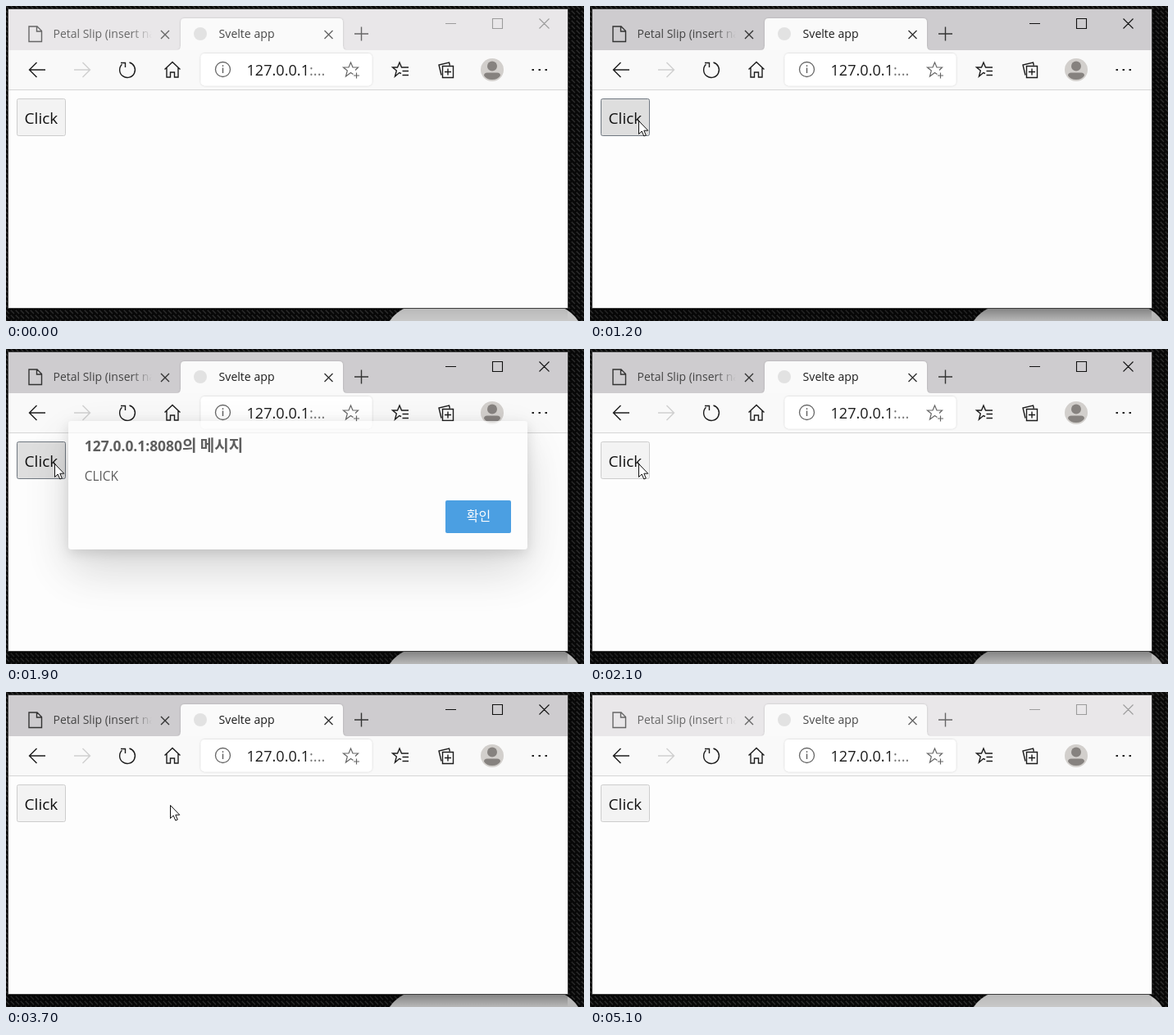
An HTML page for the animation above (5.2 s loop, 705 px wide and 385 px high).

```html
<!DOCTYPE html>
<html lang="en">
<head>
<meta charset="utf-8">
<title>Click once</title>
<style>
  html, body { margin: 0; width: 100%; height: 100%; overflow: hidden; background: #080808; }
  svg { display: block; width: 100%; height: 100%; }
  text { font-family: "Open Sans", "Noto Sans", sans-serif; white-space: pre; }
  .ko { font-family: "Noto Sans CJK KR", "Noto Sans CJK", sans-serif; }
  .line { fill: none; stroke: #1c1c1c; stroke-width: 1.4; }
  .caption { fill: none; stroke: var(--caption); stroke-width: 1.1; }
  .tab { fill: none; stroke: var(--tab); stroke-width: 1.4; }

  .active { --strip: #cecccf; --caption: #111; --tab: #333; --title: #1d1d1d; --side: #444; --blob: #b8b8b8; --shade: .3; }
  .idle { --strip: #e9e7e9; --caption: #9c9c9c; --tab: #666; --title: #484848; --side: #686868; --blob: #c8c8c8; --shade: .08; }
</style>
</head>
<body>
<svg id="stage" class="idle" viewBox="0 0 705 385">
  <defs>
    <pattern id="weave" width="6" height="6" patternUnits="userSpaceOnUse">
      <rect width="6" height="6" fill="#080808"/>
      <path d="M0 0L4 4M3 -3L7 1M-3 3L1 7" stroke="#2e2e2e" stroke-width="1.3"/>
    </pattern>
    <linearGradient id="fade" gradientUnits="userSpaceOnUse" x1="152" x2="178">
      <stop stop-color="#fff"/>
      <stop offset="1" stop-color="#000"/>
    </linearGradient>
    <mask id="cut" maskUnits="userSpaceOnUse" x="50" y="15" width="128" height="40">
      <rect x="50" y="15" width="128" height="40" fill="url(#fade)"/>
    </mask>
    <linearGradient id="under" x2="0" y2="1">
      <stop stop-color="#000"/>
      <stop offset="1" stop-color="#000" stop-opacity="0"/>
    </linearGradient>
    <linearGradient id="beside" href="#under" y2="0" x2="1"/>
    <filter id="lift" filterUnits="userSpaceOnUse" x="0" y="0" width="705" height="385">
      <feDropShadow dx="0" dy="4.8" stdDeviation="7.2" flood-opacity=".18"/>
    </filter>
    <filter id="cast" filterUnits="userSpaceOnUse" x="-50" y="0" width="805" height="385">
      <feGaussianBlur stdDeviation="28.8"/>
    </filter>
    <filter id="soft" x="-5%" y="-10%" width="110%" height="120%">
      <feDropShadow dx="0" dy="0" stdDeviation="1.2" flood-opacity=".2"/>
    </filter>
    <clipPath id="page"><rect x="3" y="3" width="682" height="366"/></clipPath>
    <path id="cross" d="M-5 -5L5 5M5 -5L-5 5"/>
    <path id="arrow" d="M20 0H0.5M9.5 -9L0.5 0L9.5 9"/>
  </defs>

  <!-- Desktop -->
  <rect width="705" height="385" fill="url(#weave)"/>
  <path d="M468 385Q475 374 489 368H678Q691 374 698 385Z" fill="var(--blob)"/>
  <rect x="3" y="369" width="682" height="16" fill="url(#under)" opacity="var(--shade)"/>
  <rect x="685" y="3" width="10" height="366" fill="url(#beside)" opacity="var(--shade)"/>

  <!-- Browser frame -->
  <rect x="2" y="3" width="684" height="367" fill="#3c3c3c"/>
  <rect x="3" y="4" width="682" height="365" fill="#fdfdfd"/>
  <rect x="3" y="4" width="682" height="50" fill="var(--strip)"/>
  <g clip-path="url(#page)">
    <path d="M208 54Q213 54 213 49V20Q213 15 218 15H406Q411 15 411 20V49Q411 54 416 54Z" fill="#fafafa" filter="url(#soft)"/>
  </g>
  <rect x="3" y="54" width="682" height="48" fill="#f9f9f9"/>
  <rect x="3" y="102" width="682" height="1" fill="#d6d6d6"/>

  <!-- Tabs -->
  <path class="tab" d="M28 25H38L43.5 30.5V43.5H28ZM37.5 25V31H43.5"/>
  <text x="57.5" y="39" font-size="14" fill="var(--side)" mask="url(#cut)">Petal Slip (insert name)</text>
  <use href="#cross" x="194" y="35" class="tab"/>
  <circle cx="237" cy="34" r="8" fill="#e2e2e2"/>
  <text x="259.6" y="39" font-size="14.1" fill="var(--title)">Svelte app</text>
  <use href="#cross" x="393.5" y="35" class="tab"/>
  <path class="tab" d="M425 34H442M433.5 25.5V42.5"/>
  <path class="caption" d="M536 21.5H549M593.5 15.5H605.5V27.5H593.5ZM650.5 15.5L662.5 27.5M662.5 15.5L650.5 27.5"/>

  <!-- Toolbar -->
  <g class="line">
    <use href="#arrow" x="28" y="78"/>
    <path d="M83 78H102.5M93.5 69L102.5 78L93.5 87" stroke="#cfcfcf"/>
    <path d="M150.5 69A9.4 9.4 0 1 1 141.5 71.3M140 69.5H145.5V75"/>
    <path d="M193.5 77.5L203 68.5L212.5 77.5M196 75.5V87H200.5V81H205.5V87H210V75.5"/>
  </g>
  <rect x="237.5" y="58" width="209" height="39.5" rx="5" fill="#fff" filter="url(#soft)"/>
  <circle cx="264.5" cy="77.5" r="9" fill="none" stroke="#666" stroke-width="1.3"/>
  <path d="M264.5 75.5V82M264.5 72.3V74" stroke="#666" stroke-width="1.5"/>
  <text x="293.5" y="85" font-size="18.1" fill="#1c1c1c">127.0.0.1<tspan fill="#777">:...</tspan></text>
  <path d="M423.5 83.5L420.5 81.5L414.5 86L416.3 79L411.5 75H418L420.5 69L423 75H429.5L426 78.5M427.5 81.5V88.5M424 85H431" fill="none" stroke="#666" stroke-width="1.2"/>
  <g class="line">
    <path d="M482 82.5L479.8 81.5L474.5 86L476.3 79L471.5 75H477.5L480 69L482.5 75H491M483.5 79.5H491M483.5 84.5H491"/>
    <path d="M531 84.5L528 72L540.5 69L541.3 72.5M532.5 73.5H545.5V87.5H532.5ZM539 76.5V84.5M535 80.5H543"/>
  </g>
  <circle cx="593" cy="78" r="14" fill="#d2cfcc"/>
  <circle cx="593" cy="73.5" r="6" fill="#86827f"/>
  <path d="M583 85Q583 81.5 587 81.5H599Q603 81.5 603 85Q600 90 593 90Q586 90 583 85Z" fill="#86827f"/>
  <path d="M641.5 78H644M649.5 78H652M657.5 78H660" stroke="#222" stroke-width="2.2"/>

  <!-- Page -->
  <rect id="button" x="13.5" y="113.5" width="59" height="45" rx="2"/>
  <text x="22.6" y="144" font-size="19" fill="#111">Click</text>

  <g clip-path="url(#page)">
    <g id="dialog">
      <rect x="76" y="123.6" width="560" height="157" rx="4" opacity=".22" filter="url(#cast)"/>
      <rect x="76" y="98" width="560" height="157" rx="4" fill="#fdfdfd" filter="url(#lift)"/>
      <text x="95.8" y="135" font-size="17.4" font-weight="700" fill="#1b1b1b">127.0.0.1:8080<tspan class="ko" font-size="19">의 메시지</tspan></text>
      <text x="95.8" y="171" font-size="15.4" fill="#1b1b1b">CLICK</text>
      <rect x="536" y="195" width="80" height="40" rx="2" fill="#0078d7"/>
      <text class="ko" x="576.5" y="220" font-size="16" fill="#fff" text-anchor="middle">확인</text>
    </g>
  </g>

  <path id="cursor" d="M.5 .5V16.5L4.2 13L6.8 19L9.3 18L6.8 12.2H11.8Z" fill="#fff" stroke="#111" stroke-linejoin="round"/>
</svg>
<script>
  const LOOP = 5200;
  const [stage, button, dialog, cursor] =
    ["stage", "button", "dialog", "cursor"].map(id => document.getElementById(id));

  // Pointer stops: time, x, y; each holds until the next
  const stops = [
    [100, 678, 61], [200, 608, 97], [300, 313, 187], [400, 268, 185], [500, 120, 172],
    [600, 43, 154], [700, 50, 149], [800, 55, 144], [900, 59, 140],
    [3700, 200, 138], [3800, 352, 133], [3900, 360, 157], [4000, 370, 166], [4100, 494, 134]
  ];

  // Dialog stops: time, opacity, vertical shift
  const popup = [[1300, .45, -21], [1400, 1, 0], [1900, .7, -10], [2000, .2, -21], [2100, 0, 0]];

  const within = (t, from, to) => t >= from && t < to;
  const latest = (list, t) => list.findLast(stop => stop[0] <= t);

  function place(el, x, y, opacity) {
    el.setAttribute("transform", `translate(${x} ${y})`);
    el.setAttribute("opacity", opacity);
  }

  function draw(t) {
    stage.setAttribute("class", within(t, 1200, 5100) ? "active" : "idle");

    const focused = within(t, 1200, 2000);
    const pressed = focused || within(t, 3100, 3200);
    button.setAttribute("fill", pressed ? "#dedede" : "#f3f3f3");
    button.setAttribute("stroke", focused ? "#6f7780" : "#cdcdcd");

    const [, opacity, shift] = latest(popup, t) || [0, 0, 0];
    place(dialog, 0, shift, opacity);

    const [, x, y] = latest(stops, t) || stops[0];
    place(cursor, x, y, within(t, 100, 4200) ? 1 : 0);
  }

  const start = performance.now();
  function tick() {
    draw((performance.now() - start) % LOOP);
    requestAnimationFrame(tick);
  }
  tick();
</script>
</body>
</html>
```
